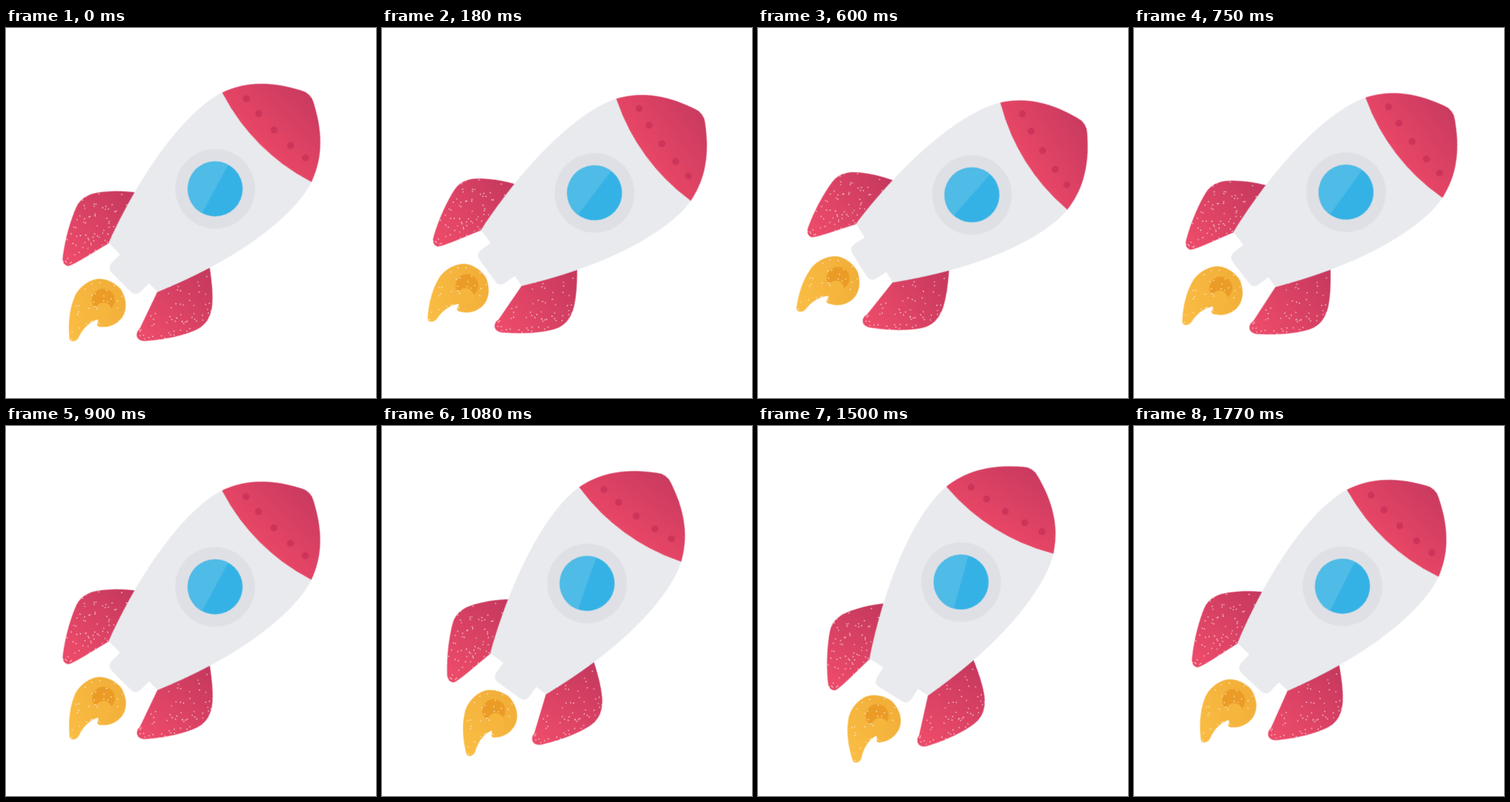
These frames come from a looping animation (480 px wide and 480 px high, 1800 ms). An HTML page:

```html
<!DOCTYPE html>
<html lang="en">
<head>
<meta charset="utf-8">
<title>Rocket</title>
<style>
  html, body { margin: 0; width: 100%; height: 100%; overflow: hidden; background: #fff; }
  svg { display: block; width: 100vw; height: 100vh; }
  /* Half a sine wave each way, starting from the middle */
  #rocket { animation: sway 900ms cubic-bezier(.3642, 0, .6358, 1) -450ms infinite alternate; }
  @keyframes sway {
    from { transform: rotate(30deg); }
    to { transform: rotate(60deg); }
  }
</style>
</head>
<body>
<svg viewBox="-240 -240 480 480">
  <defs>
    <linearGradient id="noseRed" gradientUnits="userSpaceOnUse" x1="0" y1="-218" x2="0" y2="-122">
      <stop offset="0" stop-color="#c93a60"/>
      <stop offset="1" stop-color="#ea4766"/>
    </linearGradient>
    <linearGradient id="finRed" gradientUnits="userSpaceOnUse" x1="0" y1="35" x2="0" y2="150">
      <stop offset="0" stop-color="#c5385e"/>
      <stop offset="1" stop-color="#eb4a69"/>
    </linearGradient>
    <linearGradient id="fire" gradientUnits="userSpaceOnUse" x1="20" y1="135" x2="0" y2="225">
      <stop offset="0" stop-color="#f1ae38"/>
      <stop offset="1" stop-color="#fabd44"/>
    </linearGradient>

    <path id="finLeft" d="M-50 33H-71C-84 43-103 62-109.500 76Q-115 88-110.500 100C-104.500 116-93 137-78 157Q-71.500 166-64 161.500C-60 157-54 128-47.500 103Z"/>
    <path id="finRight" d="M50 33H67.500C81 43 105 61 111 76Q117 89 112 102.500C106 118 94 138 78 156.500Q71 166 64 163Q58.500 160 59.500 154L41.500 103Z"/>
    <path id="flame" d="M-22.500 143.500C-14 136 0 132 10.500 135.700C25 140.500 35 153 33 167C31.500 178 26.500 183.500 20.500 188.500Q16 190.500 15.500 187Q15.500 185 12.500 183C8.500 190 5.500 202 11.500 218C13 224 8 230 3.500 226.500C-11 214.500-23 199.500-29 185.500C-36 170-31 151-22.500 143.500Z"/>

    <clipPath id="inLeft"><use href="#finLeft"/></clipPath>
    <clipPath id="inRight"><use href="#finRight"/></clipPath>
    <clipPath id="inFlame"><use href="#flame"/></clipPath>
    <clipPath id="inWindow"><circle cy="-44.300" r="35.700"/></clipPath>
  </defs>

  <g id="rocket">
    <g fill="url(#finRed)">
      <use href="#finLeft"/>
      <use href="#finRight"/>
    </g>
    <use href="#flame" fill="url(#fire)"/>
    <circle cx="-.5" cy="160.300" r="14.800" fill="#eb9c26"/>
    <circle cx="9.500" cy="170" r="10.500" fill="#f6b63e"/>

    <g fill="#fff">
      <path id="specksLeft" clip-path="url(#inLeft)"/>
      <path id="specksRight" clip-path="url(#inRight)"/>
      <path id="specksFlame" clip-path="url(#inFlame)"/>
    </g>

    <path fill="#e9eaee" d="M-82-139C-96-98-90-10-48 103H-27V117.500Q-27 127.500-17 127.500H16.500Q26 127.500 26 118.500V103H42C90-10 96-98 82-139Z"/>
    <path fill="url(#noseRed)" d="M-82-139C-72.500-165.500-54-191-12-213.300Q0-220 12-213.300C54-191 72.500-165.500 82-139Q0-113.500-82-139Z"/>
    <g fill="#cd3459">
      <circle cx="-54.200" cy="-155.600" r="4.500"/>
      <circle cx="-29.200" cy="-153.300" r="4.500"/>
      <circle cy="-152.400" r="4.500"/>
      <circle cx="29.200" cy="-153.300" r="4.500"/>
      <circle cx="54.200" cy="-155.600" r="4.500"/>
    </g>

    <circle cy="-44.300" r="51.700" fill="#dfe0e5"/>
    <circle cy="-44.300" r="35.700" fill="#35b2e5"/>
    <path clip-path="url(#inWindow)" fill="#4fbbe7" d="M-12.500-86L12.500-2.600H-40V-86Z"/>
  </g>
</svg>
<script>
  let seed = 7;
  const rand = () => (seed = seed * 16807 % 2147483647) / 2147483647;

  // Scatter tiny squares in a box; bias below 1 pushes them towards its bottom
  function scatter(id, count, x, y, w, h, bias) {
    let d = '';
    for (let i = 0; i < count; i++) {
      const px = x + rand() * w;
      const py = y + Math.pow(rand(), bias) * h;
      d += `M${px.toFixed(1)} ${py.toFixed(1)}h1.200v1.200h-1.200z`;
    }
    document.getElementById(id).setAttribute('d', d);
  }

  scatter('specksLeft', 120, -116, 34, 70, 132, 0.7);
  scatter('specksRight', 120, 42, 34, 76, 132, 0.7);
  scatter('specksFlame', 50, -35, 133, 70, 96, 0.9);
</script>
</body>
</html>
```
